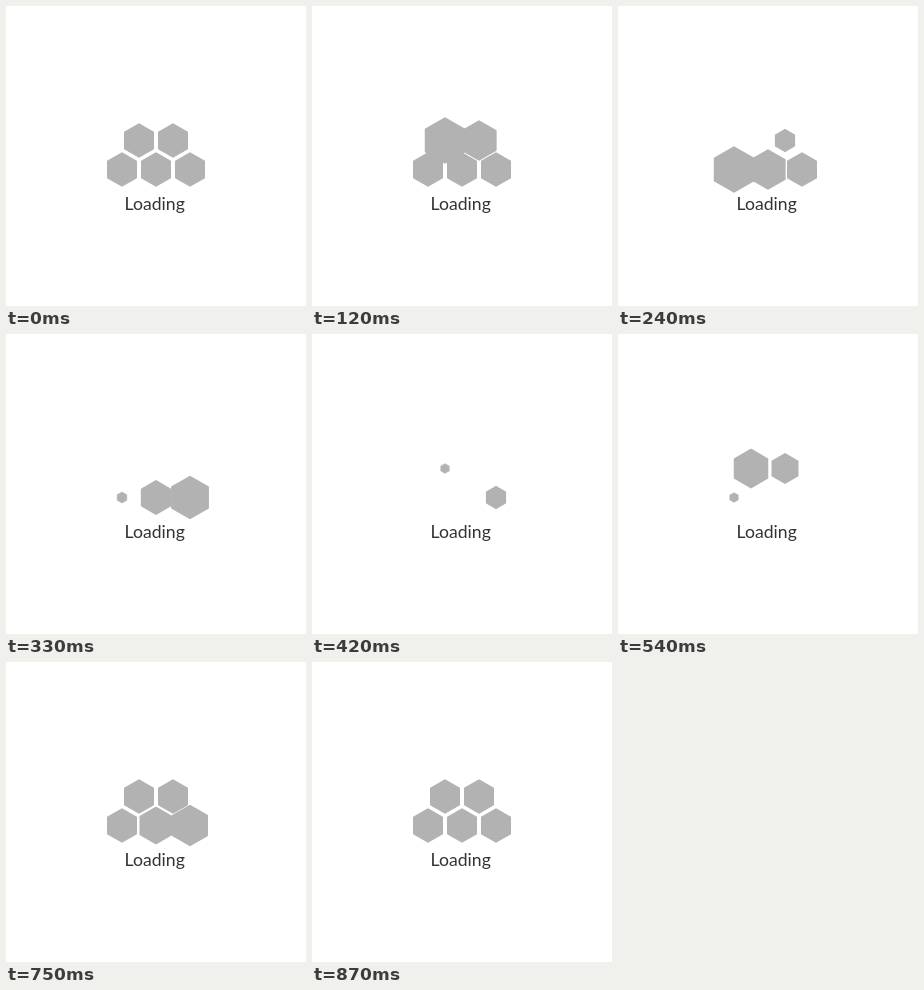
An HTML page with a canvas that plays this animation: 300 by 300 pixels, repeating every 1540 ms.

```html
<!DOCTYPE html>
<html lang="en">
<head>
<meta charset="utf-8">
<title>Loading</title>
<style>
  html, body { margin: 0; width: 100%; height: 100%; overflow: hidden; background: #fff; }
  canvas { display: block; width: 300px; height: 300px; }
</style>
</head>
<body>
<canvas id="stage" width="300" height="300"></canvas>
<script>
const ctx = document.getElementById('stage').getContext('2d');
const LOOP = 1540, STEP = 30, LAST = 870, STAGGER = 60;
const GREY = '#b2b2b2';
const HALF = 15, CORNER = 1;
const cells = [[133, 134.5], [167, 134.5], [116, 163.5], [150, 163.5], [184, 163.5]];

// [time, scale] keys for one cell: swell, vanish, pop back, settle
const keys = [[0, 1], [120, 1.35], [240, 0], [390, 0], [510, 1.2], [630, 1]];

function scaleAt(t) {
  if (t <= 0) return 1;
  for (let i = 1; i < keys.length; i++) {
    const [t0, s0] = keys[i - 1], [t1, s1] = keys[i];
    if (t < t1) return s0 + (s1 - s0) * (t - t0) / (t1 - t0);
  }
  return 1;
}

function hexagon(x, y, scale) {
  if (scale < 0.01) return;
  const round = CORNER * Math.min(1, scale);
  const r = (HALF * scale - round) / Math.cos(Math.PI / 6);
  ctx.beginPath();
  for (let i = 0; i < 6; i++) {
    const a = Math.PI / 6 + i * Math.PI / 3;
    ctx.lineTo(x + r * Math.cos(a), y + r * Math.sin(a));
  }
  ctx.closePath();
  ctx.lineWidth = 2 * round;
  ctx.fill();
  ctx.stroke();
}

function draw(time) {
  const t = Math.min(LAST, Math.floor(time / STEP) * STEP);
  ctx.fillStyle = '#fff';
  ctx.fillRect(0, 0, 300, 300);
  ctx.fillStyle = ctx.strokeStyle = GREY;
  ctx.lineJoin = 'round';
  cells.forEach(([x, y], i) => hexagon(x, y, scaleAt(t - i * STAGGER)));
  ctx.fillStyle = '#333';
  ctx.font = '17.6px Carlito, Lato, sans-serif';
  ctx.textAlign = 'center';
  ctx.fillText('Loading', 148.7, 204);
}

const start = performance.now();
function tick() {
  draw((performance.now() - start) % LOOP);
  requestAnimationFrame(tick);
}
tick();
</script>
</body>
</html>
```
